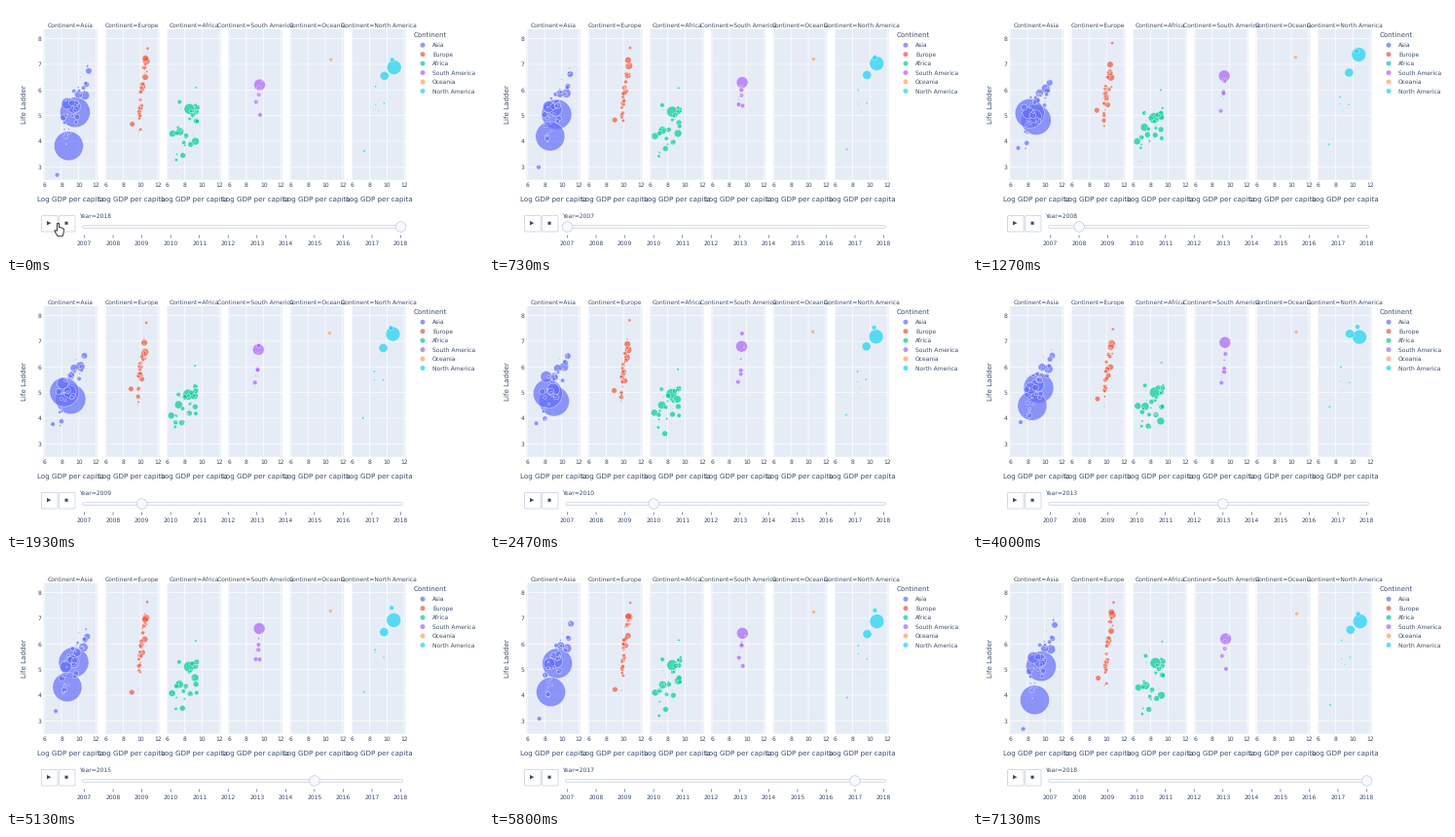
Animation, 490 px wide and 256 px high, one loop 7.19 s. Source, as a matplotlib script:

```python
import numpy as np
import matplotlib.pyplot as plt
from matplotlib.animation import FuncAnimation
from matplotlib.patches import Circle, FancyBboxPatch, Polygon, Rectangle

plt.rcParams["text.hinting"] = "none"

W, H, DPI = 490, 256, 100
LOOP, FRAMES = 7190, 108
INK, EDGE, PALE, PANEL = "#3a4d6b", "#c3ccdb", "#f7f9fc", "#e5ecf6"
PITCH, PANEL_W, TOP, BOTTOM = 63.3, 55.7, 23.7, 178.7
YEARS = np.arange(2007, 2019)
FIRST_MOVE, YEAR_STEP, MOVE, KNOB_MOVE = 520, 514, 500, 150

rng = np.random.default_rng(11)


def px_x(panel, gdp):
    return 39.2 + PITCH * panel + 8.9 * (gdp - 6)


def px_y(ladder):
    return 33.5 + 26.4 * (8 - ladder)


def pt(px):
    return px * 72 / DPI


def slot(year):
    return 80.5 + 29.55 * (year - 2007)


def cubic(u):
    u = min(max(u, 0), 1)
    return 4 * u ** 3 if u < 0.5 else 1 - 4 * (1 - u) ** 3


class Continent:
    """Leading countries with a few ladder key points, plus a random cloud."""

    def __init__(self, name, color, growth=0.015):
        self.name, self.color, self.growth = name, color, growth
        self.countries = []

    def lead(self, population, gdp, *keys):
        when = np.linspace(2007.5, 2018, len(keys))
        self.countries.append((population, gdp, np.interp(YEARS, when, keys)))
        return self

    def cloud(self, count, gdp, ladder, spread, biggest):
        for u in rng.uniform(0, 1, count):
            mid = np.interp(u, [0, 1], ladder) + rng.normal(0, spread)
            drift = np.linspace(-0.5, 0.5, len(YEARS)) * rng.normal(0, 0.4)
            wobble = rng.normal(0, 0.12, len(YEARS))
            population = 2 + biggest * rng.uniform() ** 2.5
            self.countries.append(
                (population, np.interp(u, [0, 1], gdp), mid + drift + wobble))
        return self


CONTINENTS = [
    Continent("Asia", "#636efa", 0.055)
    .lead(1390, 9.27, 4.85, 4.64, 5.21, 5.30, 5.13)
    .lead(1310, 8.53, 5.10, 4.94, 4.47, 4.29, 3.82)
    .lead(255, 9.15, 4.96, 5.30, 5.34)
    .lead(200, 8.35, 5.05, 5.70, 5.13, 5.10, 5.47)
    .lead(127, 10.40, 6.06, 5.79)
    .lead(31, 7.20, 3.73, 3.90, 2.69)
    .cloud(36, (7.8, 10.9), (4.4, 6.4), 0.42, 95),
    Continent("Europe", "#ef553b")
    .lead(82, 10.60, 6.47, 6.92, 7.13)
    .lead(64, 10.50, 7.00, 6.75, 7.23)
    .lead(60, 10.47, 6.70, 5.95, 6.50)
    .lead(45, 8.97, 5.22, 5.06, 4.80, 4.00, 4.67)
    .cloud(32, (9.7, 10.8), (4.9, 7.4), 0.3, 45),
    Continent("Africa", "#00cc96")
    .lead(180, 8.47, 4.90, 5.00, 5.26)
    .lead(98, 7.35, 4.55, 4.38)
    .lead(90, 9.15, 5.05, 4.70, 3.75, 4.85, 4.00)
    .lead(72, 6.50, 3.97, 4.25, 4.54, 4.00, 4.30)
    .lead(50, 7.70, 4.35, 3.27, 3.75, 3.45, 3.45)
    .cloud(30, (6.6, 9.5), (3.8, 5.0), 0.45, 50),
    Continent("South America", "#ab63fa")
    .lead(205, 9.45, 6.52, 6.84, 7.00, 6.53, 6.20)
    .lead(30, 9.50, 6.25, 7.45, 6.55, 5.20, 5.03)
    .cloud(8, (9.0, 9.9), (5.5, 6.5), 0.2, 45),
    Continent("Oceania", "#ffa15a")
    .lead(24, 10.56, 7.26, 7.43, 7.30, 7.18),
    Continent("North America", "#19d3f3")
    .lead(320, 10.75, 7.40, 7.15, 7.19, 6.88, 6.88)
    .lead(122, 9.63, 6.66, 6.82, 7.41, 6.30, 6.55)
    .lead(35, 10.52, 7.50, 7.58, 7.17)
    .lead(10, 7.30, 3.85, 4.50, 3.62)
    .cloud(7, (8.3, 9.8), (5.1, 6.4), 0.35, 12),
]

# Largest bubbles first, so that small ones stay visible
bubbles = sorted(((i, c, *row) for i, c in enumerate(CONTINENTS) for row in c.countries),
                 key=lambda b: -b[2])
panels = np.array([b[0] for b in bubbles])
growth = np.array([b[1].growth for b in bubbles])
radii = 15.5 * np.sqrt(np.array([b[2] for b in bubbles]) / 1390)
gdps = np.array([b[3] for b in bubbles])
ladders = np.array([b[4] for b in bubbles])


def places(index):
    """Bubble centres in the year YEARS[index]."""
    gdp = gdps + growth * (YEARS[index] - 2012.5)
    return np.column_stack([px_x(panels, gdp), px_y(ladders[:, index])])


fig = plt.figure(figsize=(W / DPI, H / DPI), dpi=DPI, facecolor="white")
ax = fig.add_axes([0, 0, 1, 1])
ax.set_xlim(0, W)
ax.set_ylim(H, 0)
ax.axis("off")


def text(x, y, label, size=6.0, ha="center"):
    return ax.text(x, y + 0.36 * size, label, fontsize=pt(size), ha=ha,
                   va="baseline", color=INK, family="DejaVu Sans")


def line(xs, ys, color, width):
    ax.plot(xs, ys, color=color, lw=pt(width), zorder=1,
            solid_capstyle="butt", snap=False)


# Panels
for i, continent in enumerate(CONTINENTS):
    left, mid = 38.4 + PITCH * i, 66.4 + PITCH * i
    ax.add_patch(Rectangle((left, TOP), PANEL_W, BOTTOM - TOP, fc=PANEL, lw=0,
                           zorder=0, snap=False))
    for ladder in range(3, 9):
        line([left, left + PANEL_W], [px_y(ladder)] * 2, "white", 0.7)
    for gdp in (6, 8, 10, 12):
        line([px_x(i, gdp)] * 2, [TOP, BOTTOM], "white", 0.7)
        text(px_x(i, gdp), 184, str(gdp))
    text(mid, 19.3, "Continent=" + continent.name)
    text(mid, 198, "Log GDP per capita", 7.1)
for ladder in range(3, 9):
    text(36.5, px_y(ladder), str(ladder), ha="right")
ax.text(19, 101, "Life Ladder", fontsize=pt(7.1), rotation=90, ha="center",
        va="center", color=INK, family="DejaVu Sans")

# Legend
text(419, 29.7, "Continent", 7.0, "left")
for i, continent in enumerate(CONTINENTS):
    y = 40.2 + 9.45 * i
    ax.add_patch(Circle((428, y), 2.5, fc=continent.color, alpha=0.7, lw=0))
    text(438, y, continent.name, ha="left")

# Buttons and slider
for x in (36, 54):
    ax.add_patch(FancyBboxPatch((x + 1, 216), 15.5, 15.5, fc="white", ec=EDGE,
                                boxstyle="round,pad=0.5,rounding_size=1", lw=pt(0.7)))
ax.add_patch(Polygon([(42, 221), (42, 225.4), (46.4, 223.2)], fc=INK, lw=0))
ax.add_patch(Rectangle((60.5, 221.7), 3.1, 3.1, fc=INK, lw=0, snap=False))
ax.add_patch(FancyBboxPatch((79, 226), 328, 2, fc=PALE, ec=EDGE, lw=pt(0.6),
                            boxstyle="round,pad=0.3,rounding_size=1", zorder=2))
for year in YEARS:
    line([slot(year)] * 2, [235.5, 238.5], INK, 0.6)
    text(slot(year), 244, str(year))
year_label = text(75, 215.3, "Year=2018", 6.0, "left")
knob = ax.add_patch(Circle((slot(2018), 227), 5.3, fc=PALE, ec=EDGE,
                           lw=pt(0.7), zorder=5))

dots = ax.scatter(*places(-1).T, s=pt(2 * radii) ** 2, c=[b[1].color for b in bubbles],
                  alpha=0.7, edgecolors="white", linewidths=pt(0.5), zorder=4)

HAND = np.array([(52.6, 223.4), (54.3, 223.4), (54.6, 227.6), (56.3, 227.8),
                 (58.2, 228.4), (59.4, 229.4), (59.2, 233), (58, 236.8),
                 (53.3, 236.8), (50.2, 232), (50, 230.6), (52.5, 231.2)])
hand = ax.add_patch(Polygon(HAND, fc="white", ec="#222222", lw=pt(0.9),
                            joinstyle="round", zorder=8))


def draw(i):
    t = i * LOOP / FRAMES
    step = min(int((t - FIRST_MOVE) // YEAR_STEP), len(YEARS) - 1)
    now, before = (step, step - 1) if step >= 0 else (-1, -1)
    past = t - FIRST_MOVE - step * YEAR_STEP
    u = min(past / MOVE, 1)
    dots.set_offsets((1 - u) * places(before) + u * places(now))
    glide = cubic(past / KNOB_MOVE)
    knob.center = ((1 - glide) * slot(YEARS[before]) + glide * slot(YEARS[now]), 227)
    year_label.set_text(f"Year={YEARS[now]}")
    hand.set_xy(HAND + [0, 40 * cubic((t - 500) / 230)])
    hand.set_visible(t < 720)
    return dots, knob, year_label, hand


anim = FuncAnimation(fig, draw, frames=FRAMES, interval=LOOP / FRAMES,
                     repeat=True, repeat_delay=0, blit=False)
plt.show()
```
